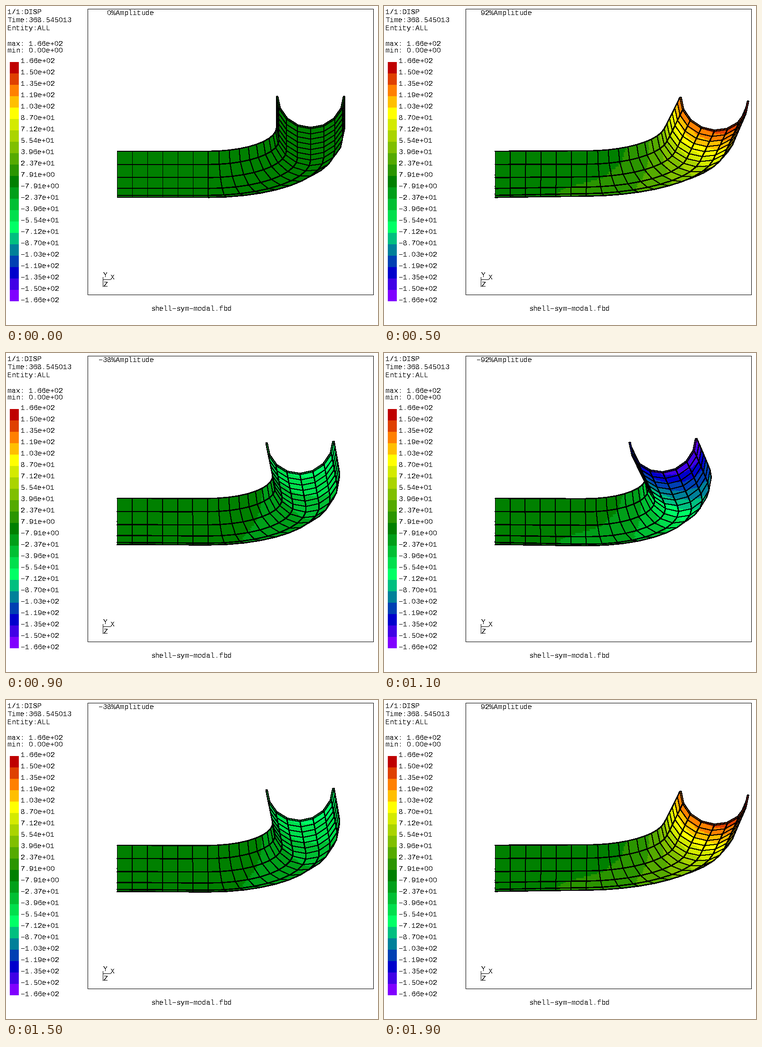
Write a matplotlib script that moves like this. It is 784x672 px and loops after 2000 ms.

```python
import numpy as np
import matplotlib.pyplot as plt
from matplotlib.animation import FuncAnimation
from matplotlib.collections import PolyCollection
from matplotlib.patches import Rectangle

plt.rcParams.update({
    "font.family": "Liberation Mono",
    "text.antialiased": False,
    "text.hinting": "force_autohint",
    "text.hinting_factor": 1,
    "toolbar": "None",
})

W, H, DPI = 784, 672, 64
PT = 72 / DPI              # points per pixel
FRAMES, INTERVAL = 20, 100
BANDS, VMAX = 21, 166.17
SUB = 6                    # colour cells per element side

# Pipe: straight leg, 90 degree elbow, straight leg (pixels)
RADIUS, WALL, LEG, BEND = 72, 3, 192, 216
ARC = BEND * np.pi / 2
TILT_A, TILT_W = 0.3444, 0.947

# ---------- colours ----------
KEYS = [-10, -8, -4, 0, 6, 8, 10]
RGB = np.array([(.5, 0, 1), (0, 0, .8), (0, 1, .4), (0, .5, 0),
                (1, 1, 0), (1, .5, 0), (.75, 0, 0)])


def band_rgb(value):
    """Flat legend colour for signed displacement values."""
    idx = np.clip(np.rint(value * BANDS / (2 * VMAX)), -10, 10)
    return np.stack([np.interp(idx, KEYS, RGB[:, c]) for c in range(3)], -1)


# ---------- shell geometry and mode shape ----------
def stations():
    leg = np.linspace(0, LEG, 7)
    elbow = LEG + np.linspace(0, ARC, 11)
    return np.concatenate([leg, elbow[1:], LEG + ARC + leg[1:]])


def shell(radius):
    """Node positions and unit mode displacement, axes (x, a, w)."""
    s = np.linspace(0, 2 * LEG + ARC, 4001)
    ds = s[1] - s[0]
    phi = np.clip((s - LEG) / BEND, 0, np.pi / 2)
    turn = 0.025 * np.clip(s / LEG, 0, 1) + 0.147 * phi / (np.pi / 2)
    oval = 6.7 * np.exp(-((s - 310) / 270) ** 2) * (1 - np.exp(-s / 80))

    def along(f):
        steps = (f[1:] + f[:-1]) / 2 * ds
        return np.concatenate([[0], np.cumsum(steps)])

    curves = [phi, turn, oval, along(np.cos(phi)), along(np.sin(phi)),
              along(turn * np.sin(phi)), along(-turn * np.cos(phi))]
    st = stations()
    phi, turn, oval, x, a, ux, ua = (np.interp(st, s, c)[:, None] for c in curves)

    th = np.linspace(0, np.pi, 9)[None, :]
    ct, sn = np.cos(th), np.sin(th)
    nx, na = np.sin(phi), -np.cos(phi)
    pos = np.stack([x + radius * ct * nx,
                    a + radius * ct * na,
                    radius * sn + 0 * x], -1)

    # bending rotation plus flattening of the cross section
    c2, s2 = np.cos(2 * th), np.sin(2 * th) / 2
    out = oval * (c2 * ct + s2 * sn)
    dx = ux - turn * radius * ct * -na + out * nx
    da = ua - turn * radius * ct * nx + out * na
    dw = oval * (c2 * sn - s2 * ct)
    return pos, np.stack([dx, da, dw], -1)


def project(v):
    """Screen x, screen y, depth towards the viewer."""
    x, a, w = np.moveaxis(v, -1, 0)
    return np.stack([x, TILT_W * w - TILT_A * a, TILT_W * a + TILT_A * w], -1)


def quads(g):
    """Corners of every cell of a node grid (rows, columns, values)."""
    q = np.stack([g[:-1, :-1], g[1:, :-1], g[1:, 1:], g[:-1, 1:]], 2)
    return q.reshape(-1, 4, g.shape[-1])


def elements():
    outer, inner = shell(RADIUS), shell(RADIUS - WALL)

    def gather(f):
        body = f(*outer)
        rim = np.stack([body[-1], f(*inner)[-1]])
        return np.concatenate([quads(body), quads(rim)])

    rest = gather(lambda p, d: project(p)) + (234, 330.8, 0)
    move = gather(lambda p, d: project(d))
    size = gather(lambda p, d: np.linalg.norm(d * (1, 1.15, 1), axis=-1)[..., None])
    return rest, move, size * VMAX / size.max()


REST, MOVE, SIZE = elements()
COUNT = len(REST)
CELLS = SUB * SUB

t = np.linspace(0, 1, SUB + 1)
U, V = np.meshgrid(t, t, indexing="ij")
BLEND = quads(np.stack([(1 - U) * (1 - V), U * (1 - V), U * V, (1 - U) * V], -1))


def split(corners):
    """Cut every element into SUB x SUB cells."""
    return np.einsum("kpc,ecd->ekpd", BLEND, corners)


CELL_SIZE = split(SIZE).mean(axis=(2, 3))
EDGES = [(0, 1), (1, 2), (2, 3), (3, 0)]
EDGE_WIDTHS = [1.6, 1, 1.6, 1]         # lengthwise, around, lengthwise, around
ITEMS = CELLS + len(EDGES)

LINE_W = np.tile([0] * CELLS + [w * PT for w in EDGE_WIDTHS], COUNT)
LINE_C = np.zeros((COUNT, ITEMS, 4))
LINE_C[:, CELLS:, 3] = 1
LINE_C = LINE_C.reshape(-1, 4)


def mesh(amp):
    """Cells and edges with their fills, sorted from back to front."""
    now = REST + amp * MOVE
    order = np.argsort(now[..., 2].mean(axis=1), kind="stable")
    flat = now[..., :2]
    edges = np.stack([flat[:, [i, i, j, j]] for i, j in EDGES], 1)
    polys = np.concatenate([split(flat), edges], 1)[order]
    fill = np.zeros((COUNT, ITEMS, 4))
    fill[:, :CELLS, :3] = band_rgb(amp * CELL_SIZE)
    fill[:, :CELLS, 3] = 1
    return polys.reshape(-1, 4, 2), fill[order].reshape(-1, 4)


# ---------- stage ----------
fig = plt.figure(figsize=(W / DPI, H / DPI), dpi=DPI, facecolor="white")
ax = fig.add_axes([0, 0, 1, 1])
ax.set_xlim(0, W)
ax.set_ylim(H, 0)
ax.axis("off")

# plain zeros and wide dashes, as in a terminal bitmap font
GLYPHS = str.maketrans({"0": "O", "-": "\u2212"})


def label(x, y, s):
    return ax.text(x, y, s.translate(GLYPHS), size=15 * PT, color="black",
                   ha="left", va="baseline")


def line(xs, ys):
    ax.plot(xs, ys, color="black", lw=PT, antialiased=False)


for y, s in [(17, "1/1:DISP"), (34, "Time:368.545013"), (51, "Entity:ALL"),
             (84, "max: 1.66e+02"), (98, "min: 0.00e+00")]:
    label(3, y, s)

step = 2 * VMAX / BANDS
for k in range(BANDS):
    ax.add_patch(Rectangle((8, 118 + 24 * k), 19, 24, lw=0, antialiased=False,
                           facecolor=band_rgb((10 - k) * step)))
for k in range(BANDS + 1):
    label(31, 120 + 24 * k, f"{VMAX - k * step:.2e}")

line([172.5, 774.5, 774.5, 172.5, 172.5], [6, 6, 608, 608, 6])
line([204.5, 204.5], [571, 591])
line([204.5, 220], [576, 576])
label(205, 571, "Y")
label(220, 576, "X")
label(205, 591, "Z")
label(306, 642, "shell-sym-modal.fbd")

pipe = PolyCollection([], closed=False, antialiaseds=False)
ax.add_collection(pipe, autolim=False)
amp_text = label(213, 19, "")


def draw(n):
    amp = np.sin(n * np.pi / 8)
    polys, fill = mesh(amp)
    pipe.set_verts(polys, closed=False)
    pipe.set_facecolor(fill)
    pipe.set_edgecolor(LINE_C)
    pipe.set_linewidth(LINE_W)
    caption = f"{int(round(100 * amp))}%Amplitude"
    amp_text.set_text(caption.translate(GLYPHS))
    amp_text.set_x(312 - 9 * len(caption))
    return pipe, amp_text


anim = FuncAnimation(fig, draw, frames=FRAMES, interval=INTERVAL,
                     init_func=lambda: draw(0), repeat=True, repeat_delay=0)
plt.show()
```
